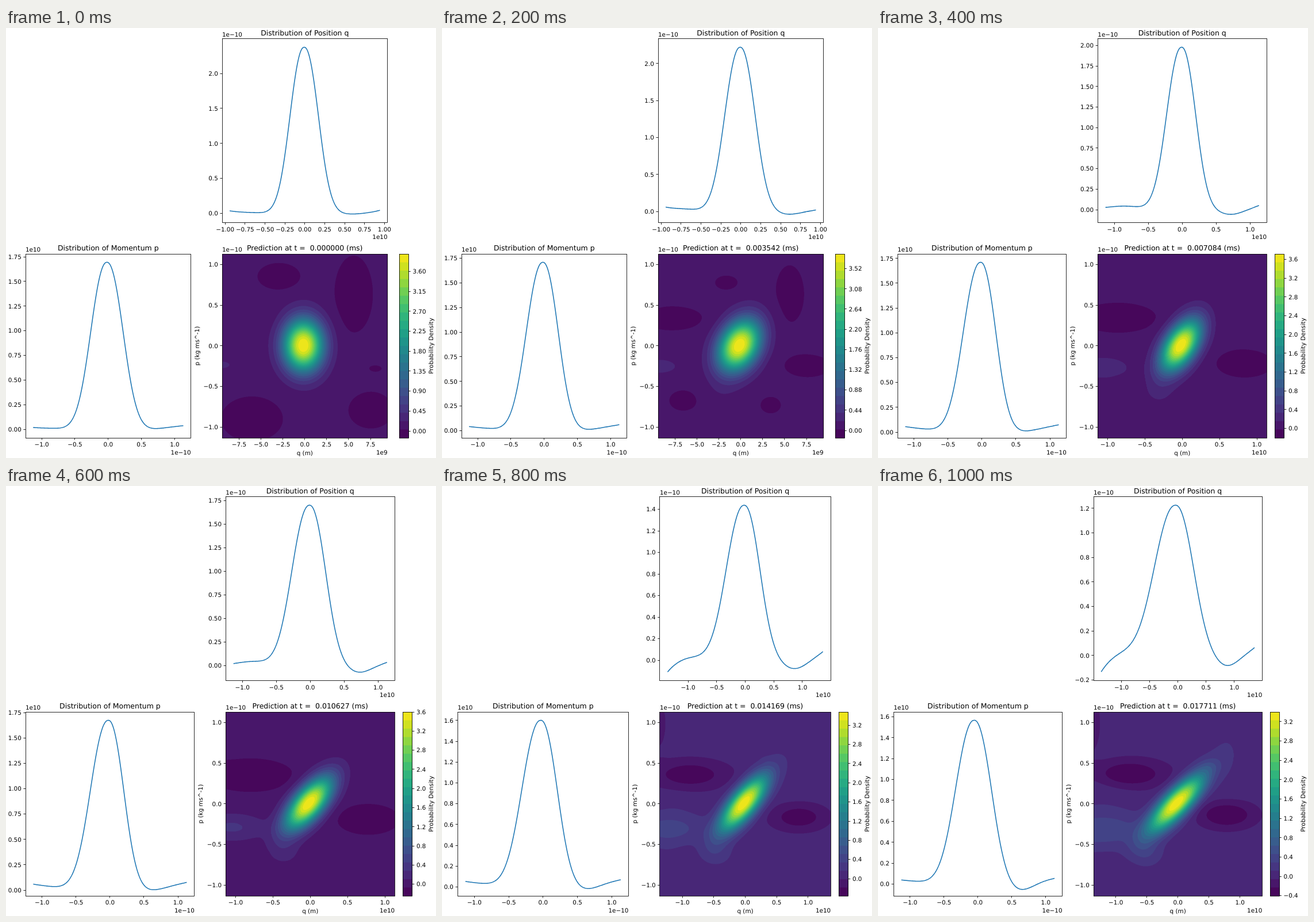
An HTML page with a canvas for the animation above (1200 ms loop, 748 by 748 pixels).

```html
<!DOCTYPE html>
<html lang="en">
<head>
<meta charset="utf-8">
<title>Phase space prediction</title>
<style>
html, body { margin: 0; width: 100%; height: 100%; overflow: hidden; background: #fff; }
canvas { display: block; }
</style>
</head>
<body>
<canvas id="stage" width="748" height="748"></canvas>
<script>
const ctx = document.getElementById('stage').getContext('2d');
ctx.textRendering = 'geometricPrecision';
const STEPS = 6, STEP_MS = 200, BANDS = 22, MARGIN = 14.5;
const UPPER = [18.9, 338.4], LOWER = [393, 713];
const HALF_P = 1.13;   // half extent of p, in 1e-10
const SHAPE = 1.1;     // above 1: rounder top and shorter foot than a normal bell

// One value per time step
const key = {
  left: [34, 34, 34, 34, 27.2, 27.2],
  width: [287.5, 287.5, 293.8, 293.8, 297.2, 293.3],
  bar: [684.2, 684.2, 690.7, 690.7, 690.7, 682.2],
  zeroQ: [322.5, 319.2, 316, 312.4, 303, 294.8],
  zeroP: [698.2, 700.5, 703, 703, 697.5, 692.5],
  peakQ: [2.375, 2.22, 1.98, 1.7, 1.438, 1.225],
  peakP: [1.695, 1.71, 1.711, 1.675, 1.602, 1.567],
  low: [-.155, -.162, -.2, -.245, -.36, -.404],
  high: [3.995, 3.84, 3.716, 3.6, 3.48, 3.4],
  endL: [4, 6, 1, 0, -24, -32],
  endR: [5.5, 3, 8, 6.5, 16, 15]
};

// Slow swells around the hump: strength, x, y with their change per step, radii, growth
const swells = [
  [-.4, -.45, -128, 8, -47, -1, 62, 24, 0],
  [-.4, -.45, 125, -8, 39, -4, 45, 22, 0],
  [.9, .3, -145, 3, 33, 2.5, 22, 9, .5],
  [-.95, .3, -45, 20, -121, 11, 40, 25, -.3],
  [-.95, .3, 85, 0, -90, 0, 36, 72, 0],
  [-.95, .3, -92, -8, 127, -32, 58, 42, -.4],
  [-.95, .3, 115, -63, 112, -9, 42, 34, -.4],
  [.58, -.32, -150, 0, -140, 0, 15, 50, 0],
  [0, .3, -30, -5, 80, 1, 28, 24, 0]
];

const viridis = [
  [.27773, .10509, -.33086, -4.63423, 6.22827, 4.77638, -5.43546],
  [.00541, 1.40461, .21485, -5.7991, 14.17993, -13.74515, 4.64585],
  [.3341, 1.38459, .0951, -19.33244, 56.69055, -65.35303, 26.31244]
];
const color = t => viridis.map(c => Math.round(255 * c.reduceRight((sum, a) => sum * t + a, 0)));
const palette = Array.from({ length: BANDS }, (_, n) => color((n + .35) / BANDS));

const bell = z => Math.exp(-Math.pow(z * z / 2, SHAPE));
const bump = (s, at, width) => Math.exp(-(((s - at) / width) ** 2));
const snap = v => Math.floor(v) + .5;
const spread = peak => 1 / (Math.sqrt(2 * Math.PI) * peak);
const halfQ = i => .943 * 1.2 ** Math.floor(i / 2);   // half extent of q, in 1e10
const niceStep = range => [.2, .25, .5].find(s => s >= range / 9);

function text(str, x, y, align = 'center', size = 10.39) {
  ctx.font = size + 'px "DejaVu Sans", sans-serif';
  ctx.textAlign = align;
  ctx.fillText(str, x, y);
}

function sideText(str, x, y) {
  ctx.save();
  ctx.translate(x, y);
  ctx.rotate(-Math.PI / 2);
  text(str, 0, 3);
  ctx.restore();
}

function line(x1, y1, x2, y2) {
  ctx.beginPath();
  ctx.moveTo(x1, y1);
  ctx.lineTo(x2, y2);
  ctx.stroke();
}

function label(value, digits) {
  return (value < 0 ? '\u2212' : '') + Math.abs(value).toFixed(digits);
}

function box(left, [top, bottom], width) {
  const x = snap(left), y = snap(top);
  ctx.strokeRect(x, y, snap(left + width) - x, snap(bottom) - y);
}

// half: value at the right edge; axes narrower than one unit are labelled tenfold
function ticksX(left, width, bottom, half) {
  const step = niceStep(2 * half), factor = half < 1 ? 10 : 1;
  const digits = step === .25 && factor === 1 ? 2 : 1;
  const last = Math.floor(half / step);
  for (let k = -last; k <= last; k++) {
    const x = left + width / 2 * (1 + k * step / half);
    line(snap(x), bottom, snap(x), bottom + 3.64);
    text(label(k * step * factor, digits), x, bottom + 15.3);
  }
}

function ticksY(x, [top, bottom], zero, unit, step = niceStep((bottom - top) / unit), side = -1) {
  const digits = Number.isInteger(Math.round(step * 1000) / 100) ? 1 : 2;
  for (let k = -2; k <= 9; k++) {
    const y = zero - k * step * unit;
    if (y < top - .5 || y > bottom + .5) continue;
    line(x, snap(y), x + side * 3.64, snap(y));
    text(label(k * step, digits), x + side * 7.27, y + 3.8, side < 0 ? 'right' : 'left');
  }
}

function panel(left, [top, bottom], width, title, scaleY, scaleX) {
  box(left, [top, bottom], width);
  text(title, left + width / 2, top - 6.4, 'center', 12.47);
  text(scaleY, left, top - 3.6, 'left');
  text(scaleX, left + width, bottom + 28.9, 'right');
}

// A skewed bell on a tail; s runs from -1 to 1 across the data
function curve(left, width, top, zero, { sigma, skew, shift, tail }) {
  const half = width / 2.2, height = zero - top - MARGIN;
  ctx.beginPath();
  for (let n = -100; n <= 100; n++) {
    const s = n / 100, dx = s * half - shift;
    const z = dx / (sigma * half * (dx < 0 ? 1 + skew : 1 - skew));
    ctx.lineTo(left + width / 2 + s * half, zero - tail(s) - height * bell(z));
  }
  ctx.save();
  ctx.strokeStyle = '#1f77b4';
  ctx.lineWidth = 1.56;
  ctx.lineJoin = 'round';
  ctx.stroke();
  ctx.restore();
}

const position = i => ({
  sigma: spread(key.peakQ[i]) / halfQ(i),
  skew: .017 * i,
  shift: -1 - 3 * (i / 5) ** 6,
  tail: s => s < 0
    ? key.endL[i] * s ** 6 + Math.min(7, 1 + 2.5 * i) * bump(s, -.75, .3)
    : key.endR[i] * s ** 6 - (1.5 + 3.6 * i) * bump(s, .64, .22)
});

function momentum(i) {
  const rise = 10.4 - .8 * (i - 3) ** 2;
  return {
    sigma: .97 * spread(key.peakP[i]) / HALF_P,
    skew: .08 * Math.sin(Math.PI * i / 6),
    shift: -2.2 - 4.2 * (i / 5) ** 4,
    tail: s => s < 0 ? rise * s * s
      : (rise + 3.3) * s * s - (2 + .1 * i ** 3) * bump(s, .55, .25)
  };
}

// Density in colour bands, sampled at double resolution
function densityMap(i) {
  const width = key.width[i], sq = .95 * spread(key.peakQ[i]) / halfQ(i) * width / 2;
  const sp = .95 * spread(key.peakP[i]) / HALF_P * 160;
  const drift = .0555 * i, rho = .93 * drift / Math.hypot(.168, drift);
  const rest = Math.floor(BANDS * (.05 - key.low[i]) / (key.high[i] - key.low[i])) + .4;
  const spots = swells.map(([amp, da, x, dx, y, dy, rx, ry, grow]) => [
    amp + da * i, x + dx * i, y + dy * i, rx * (1 + grow * i), ry * (1 + grow * i)]);
  const map = document.createElement('canvas');
  map.width = Math.round(width * 2);
  map.height = 2 * (LOWER[1] - LOWER[0]);
  const pen = map.getContext('2d'), image = pen.createImageData(map.width, map.height);
  let o = 0;
  for (let row = 0; row < map.height; row++) {
    const y = (row + .5 - map.height / 2) / 2, v = -(y + 1) / sp;
    for (let col = 0; col < map.width; col++) {
      const x = (col + .5 - map.width / 2) / 2, u = (x + 2.5) / sq;
      const z = Math.sqrt((u * u - 2 * rho * u * v + v * v) / (1 - rho * rho));
      let f = rest + (BANDS - rest) * bell(z);
      for (const [amp, cx, cy, rx, ry] of spots) {
        const e = ((x - cx) / rx) ** 2 + ((y - cy) / ry) ** 2;
        if (e < 8) f += amp * Math.exp(-e);
      }
      for (const c of palette[Math.max(0, Math.min(BANDS - 1, Math.floor(f)))]) image.data[o++] = c;
      image.data[o++] = 255;
    }
  }
  pen.putImageData(image, 0, 0);
  return map;
}

const maps = Array.from({ length: STEPS }, (_, i) => densityMap(i));

function colorBar(i) {
  const x = key.bar[i], [top, bottom] = LOWER, width = 16;
  palette.forEach((_, n) => {
    const y = top + n * (bottom - top) / BANDS;
    ctx.fillStyle = `rgb(${palette[BANDS - 1 - n]})`;
    ctx.fillRect(x, y, width, bottom - y);
  });
  ctx.fillStyle = '#000';
  box(x, LOWER, width);
  const unit = (bottom - top) / (key.high[i] - key.low[i]);
  ticksY(x + width, LOWER, bottom + key.low[i] * unit, unit, [.45, .44, .4][Math.min(i, 2)], 1);
  sideText('Probability Density', 740, 553);
}

function draw(i) {
  const left = key.left[i], width = key.width[i], right = left + width + 54.5;
  const half = halfQ(i), small = '1e\u221210', large = '1e10';
  const unitOf = (zero, top, peak) => (zero - top - MARGIN) / peak;
  ctx.fillStyle = '#fff';
  ctx.fillRect(0, 0, 748, 748);
  ctx.fillStyle = ctx.strokeStyle = '#000';
  ctx.lineWidth = .83;

  const zeroQ = key.zeroQ[i];
  curve(right, width, UPPER[0], zeroQ, position(i));
  panel(right, UPPER, width, 'Distribution of Position q', small, large);
  ticksX(right, width, UPPER[1], half * 1.1);
  ticksY(right, UPPER, zeroQ, unitOf(zeroQ, UPPER[0], key.peakQ[i]));

  const zeroP = key.zeroP[i];
  curve(left, width, LOWER[0], zeroP, momentum(i));
  panel(left, LOWER, width, 'Distribution of Momentum p', large, small);
  ticksX(left, width, LOWER[1], HALF_P * 1.1);
  ticksY(left, LOWER, zeroP, unitOf(zeroP, LOWER[0], key.peakP[i]));

  ctx.drawImage(maps[i], right, LOWER[0], width, LOWER[1] - LOWER[0]);
  const time = (i * .0035422).toFixed(6);
  panel(right, LOWER, width, `Prediction at t =  ${time} (ms)`, small, half < 1 ? '1e9' : large);
  ticksX(right, width, LOWER[1], half);
  ticksY(right, LOWER, 552.9, 160 / HALF_P);
  text('q (m)', right + width / 2, 743);
  sideText('p (kg ms^-1)', right - 43.3, 553);
  colorBar(i);
}

let shown = -1;
function tick(now) {
  const i = Math.floor(now / STEP_MS) % STEPS;
  if (i !== shown) draw(shown = i);
  requestAnimationFrame(tick);
}
tick(0);
</script>
</body>
</html>
```
